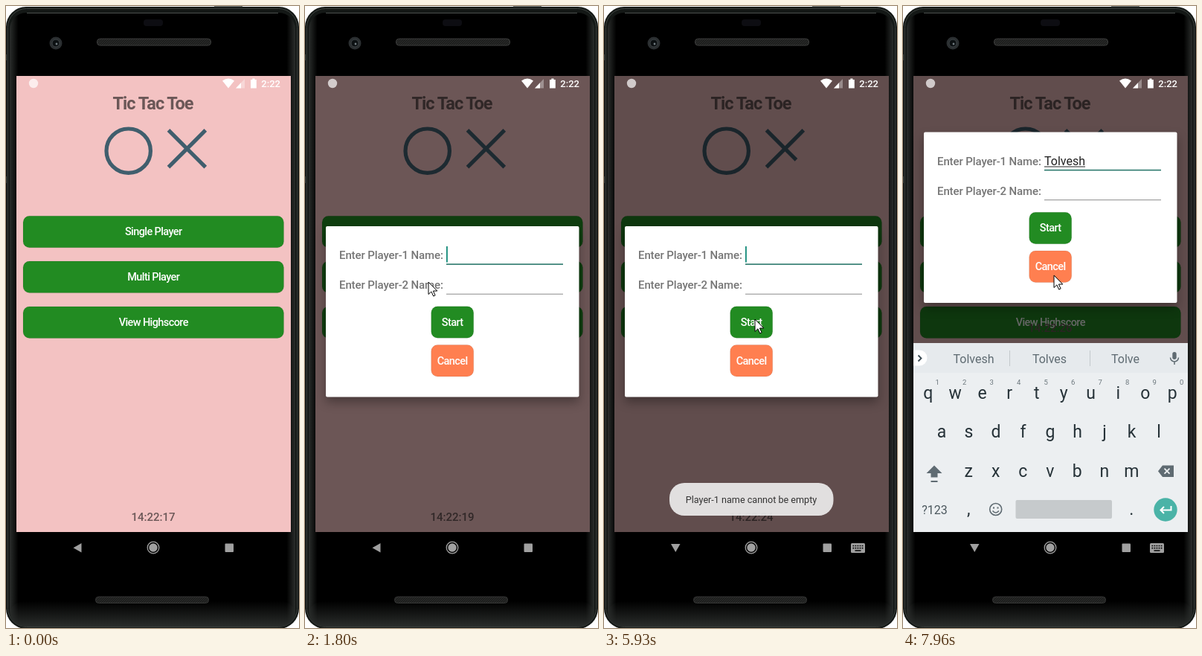
Write an HTML page that moves like this. It is 394 px wide and 836 px high and loops after 7990 ms.

```html
<!DOCTYPE html>
<html lang="en">
<head>
<meta charset="utf-8">
<title>Tic Tac Toe</title>
<style>
html, body { margin: 0; width: 100%; height: 100%; overflow: hidden; background: #fff; }
svg { display: block; width: 100%; height: 100%; }
text { font-family: Roboto, "Noto Sans", sans-serif; }
.mid { text-anchor: middle; }
.title { font-size: 23.5px; font-weight: 700; letter-spacing: -1px; fill: #6b5757; }
.btn { font-size: 14.5px; font-weight: 500; letter-spacing: -.6px; fill: #fff; }
.label { font-size: 15px; font-weight: 500; letter-spacing: -.1px; fill: #757575; }
.clock { font-size: 15px; font-weight: 500; fill: #6b5757; }
.key { font-size: 23px; fill: #263238; }
.num { font-size: 9.5px; fill: #6c777d; }
.sug { font-size: 16px; fill: #5f6b72; }
#dialogBox { filter: drop-shadow(0 7px 7px rgba(0,0,0,.32)); }
</style>
</head>
<body>
<svg viewBox="0 0 394 836">
  <defs>
    <linearGradient id="side">
      <stop offset="0" stop-color="#2a2d2b"/><stop offset=".03" stop-color="#000"/>
      <stop offset=".97" stop-color="#000"/><stop offset="1" stop-color="#2a2d2b"/>
    </linearGradient>
    <linearGradient id="foot" x2="0" y2="1">
      <stop offset="0" stop-color="#2a2d2b" stop-opacity="0"/><stop offset="1" stop-color="#2a2d2b"/>
    </linearGradient>
    <pattern id="mesh" width="3" height="3" patternUnits="userSpaceOnUse">
      <rect width="3" height="3" fill="#282928"/><path d="M0 3L3 0" stroke="#161716"/>
    </pattern>
  </defs>

  <g id="phone">
    <rect y="1" width="394" height="836" rx="27" fill="#141816"/>
    <rect x="2.500" y="3.500" width="389" height="831" rx="25" fill="none" stroke="#3b403d"/>
    <rect x="5" y="9" width="384" height="825" rx="22" fill="url(#side)"/>
    <rect x="5" y="800" width="384" height="34" rx="20" fill="url(#foot)"/>
    <path d="M28 9.5H366" stroke="#4a4f4c"/>
    <path d="M.5 65v8M.5 229v9M280 .8h38" stroke="#3b403d"/>
    <rect x="185" y="18" width="26" height="9" rx="4" fill="#0d0d12"/>
    <circle cx="67" cy="50" r="8.500" fill="#2b2f31"/>
    <circle cx="67" cy="50" r="5" fill="#0c1012" stroke="#3d4346"/>
    <circle cx="68" cy="51" r="1.400" fill="#717b80"/>
    <rect x="122.500" y="44" width="153" height="9" rx="4" fill="url(#mesh)" stroke="#3c3d3c"/>
    <rect x="120.500" y="794" width="152" height="8.500" rx="4" fill="url(#mesh)" stroke="#363736"/>
  </g>

  <rect x="14" y="94" width="369" height="613" fill="#f3c2c2"/>
  <text class="title mid" x="197.500" y="138.700">Tic Tac Toe</text>
  <g fill="none" stroke="#405e6d" stroke-width="5.200">
    <circle id="ring" cx="164.700" cy="194.700" r="29.700" pathLength="1"/>
    <path id="rise" d="M218.500 216.700L268.300 166.900" pathLength="1"/>
    <path id="fall" d="M218.500 166.900L268.300 216.700" pathLength="1"/>
  </g>
  <g id="menu"></g>
  <text id="clock" class="clock mid" x="198" y="691.500"></text>
  <rect id="dim" x="14" y="94" width="369" height="613"/>

  <g id="status" fill="#fff">
    <circle cx="37" cy="104" r="6.200" opacity=".7"/>
    <path d="M291 100.500Q299 94.500 307 100.500L299 110.500Z"/>
    <path d="M321 98V110.500H309Z" opacity=".35"/>
    <path d="M316 103.200V110.500H309Z"/>
    <path d="M329 99h2.300v-1.500h3.200V99h2.300v11.500H329Z"/>
    <text x="343.300" y="109" font-size="13" font-weight="500">2:22</text>
  </g>

  <g id="dialog">
    <rect id="dialogBox" x="28" y="296" width="340.500" height="229.500" rx="2" fill="#fff"/>
    <text class="label" x="46" y="340">Enter Player-1 Name:</text>
    <text class="label" x="46" y="380">Enter Player-2 Name:</text>
    <rect x="190" y="346.300" width="157" height="1.600" fill="#2c786c"/>
    <rect x="190" y="386.700" width="157" height="1" fill="#8a8a8a"/>
    <text id="name" x="190" y="340" font-size="16" fill="#212121"></text>
    <rect id="nameLine" x="190" y="342" height="1" fill="#212121"/>
    <rect id="caret" y="323" width="1.800" height="21.500" fill="#128a78"/>
    <g id="actions"></g>
  </g>

  <g id="board">
    <rect x="14" y="453" width="369" height="254" fill="#eceff1"/>
    <rect x="14" y="453" width="369" height="40" fill="#e6eaed"/>
    <path d="M14 462.500H22a10.500 10.500 0 0 1 0 21H14Z" fill="#fff"/>
    <path d="M20.500 469.500l4 4-4 4" fill="none" stroke="#37474f" stroke-width="1.800"/>
    <path d="M143.500 463v21M251.500 463v21" stroke="#c3c9cc"/>
    <g id="sugs"></g>
    <g fill="#5f6b72">
      <rect x="362.300" y="465" width="5.400" height="10" rx="2.700"/>
      <path d="M359.500 472.500a5.500 5.500 0 0 0 11 0M365 478v4" fill="none" stroke="#5f6b72" stroke-width="1.500"/>
      <path d="M42 617.500l10.500 10.500H46.500v5.500h-9V628H31.500Z"/>
      <rect x="37.500" y="638" width="9" height="2"/>
      <path d="M349 617.500h15v15.500h-15l-6-7.700Z"/>
    </g>
    <path d="M351.500 621.700l7 7m0-7l-7 7" stroke="#eceff1" stroke-width="1.800"/>
    <g id="keys"></g>
    <text class="mid" x="42.500" y="682.500" font-size="16" fill="#4c585e">?123</text>
    <g fill="none" stroke="#5f6b72" stroke-width="1.600">
      <circle cx="124.700" cy="676.500" r="8"/>
      <path d="M120.500 678.500q4.200 5 8.400 0"/>
      <path d="M121 674.500h2m3.500 0h2" stroke-width="2"/>
    </g>
    <rect x="151.500" y="664" width="129.500" height="25" rx="2" fill="#c6cacc"/>
    <circle cx="353" cy="677" r="15.700" fill="#4ab3a7"/>
    <path d="M360.500 672v5.500H346.500m4.500-4.500l-4.500 4.500 4.500 4.500" fill="none" stroke="#fff" stroke-width="2"/>
  </g>

  <g id="toast">
    <rect x="88" y="641" width="220.500" height="44" rx="20" fill="#eeeeee" opacity=".91"/>
    <text class="mid" x="198" y="668" font-size="12.600" fill="#333">Player-1 name cannot be empty</text>
  </g>

  <g fill="#a0a0a0">
    <path id="back"/>
    <circle cx="198" cy="728" r="5.700"/>
    <circle cx="198" cy="728" r="7.800" fill="none" stroke="#a0a0a0" stroke-width="1.300"/>
    <rect x="294.500" y="722.500" width="11.500" height="11.500" rx="1"/>
    <g id="boardIcon">
      <rect x="332" y="722" width="19" height="13" rx="1.500"/>
      <path d="M334.500 725.500h14m-14 3.200h14" stroke="#000" stroke-width="1.700" stroke-dasharray="1.700 1.350"/>
      <path d="M337.500 732h8" stroke="#000" stroke-width="1.500"/>
    </g>
  </g>

  <path id="mouse" d="M0 0V16.500L3.900 12.900 6.700 19 9.100 17.900 6.400 12H11.800Z" fill="#fff" stroke="#000"/>
  <circle id="press" r="15" fill="#ff0" opacity=".52"/>
</svg>
<script>
const LOOP = 7990;
const $ = id => document.getElementById(id);
const set = (id, attrs) => {
  for (const k in attrs) $(id).setAttribute(k, attrs[k]);
};
const show = (id, on) => { $(id).style.visibility = on ? 'visible' : 'hidden'; };
const clamp = v => Math.max(0, Math.min(1, v));

const linear = x => x;
const easeOut = x => 1 - (1 - x) ** 2;
const smooth = x => x * x * (3 - 2 * x);

// Value of a [time, value] table at t
function track(steps, t, ease = linear) {
  if (t <= steps[0][0]) return steps[0][1];
  for (let i = 1; i < steps.length; i++) {
    const [t0, a] = steps[i - 1], [t1, b] = steps[i];
    if (t < t1) return a + (b - a) * ease((t - t0) / (t1 - t0));
  }
  return steps[steps.length - 1][1];
}
// Last entry already reached in a [time, value] list
const latest = (steps, t) => steps.filter(s => s[0] <= t).pop()[1];

const button = (x, y, w, fill, label) =>
  `<rect x="${x}" y="${y}" width="${w}" height="42.500" rx="8.500" fill="${fill}" stroke="#000" stroke-opacity=".12" stroke-width=".7"/>
   <text class="btn mid" x="${x + w / 2}" y="${y + 26}">${label}</text>`;
$('menu').innerHTML = ['Single Player', 'Multi Player', 'View Highscore']
  .map((s, i) => button(23, 282.3 + i * 60.8, 350.5, '#228b22', s)).join('');
$('actions').innerHTML =
  button(169.7, 403.8, 57, '#228b22', 'Start') + button(169.7, 455.5, 57, '#ff7f50', 'Cancel');

const rows = [['qwertyuiop', 33.7, 527.5], ['asdfghjkl', 52, 580], ['zxcvbnm', 88.3, 632.5]];
const keyText = (c, x, y, cls = 'key') => `<text class="${cls} mid" x="${x}" y="${y}">${c}</text>`;
$('keys').innerHTML = rows.map(([letters, x0, y], r) => [...letters].map((c, i) => {
  const x = x0 + i * 36.5;
  return keyText(c, x, y) + (r ? '' : keyText((i + 1) % 10, x + 12.5, 509, 'num'));
}).join('')).join('') + keyText(',', 88.3, 684) + keyText('.', 307.3, 684);
$('sugs').innerHTML = [95, 197, 299].map(x => keyText('', x, 479.5, 'sug')).join('');

const LOGO = [[0, 1], [80, 1], [400, 0], [1670, 1], [1850, 1], [2250, 0], [3560, 1],
  [3790, 1], [4475, 0], [5700, 1], [5890, 1], [6700, 0], [7960, 1]];
const TICKS = [0, 500, 1400, 2350, 3150, 4000, 4900, 5700, 6820, 7750];
const MOUSE_X = [[300, 300], [1100, 166], [1900, 166], [2200, 320], [2420, 343], [3820, 343], [4480, 203]];
const MOUSE_Y = [[300, 711], [1100, 371], [1900, 371], [2200, 272], [2420, 315], [3820, 315], [4480, 421],
  [7710, 421], [7940, 362]];
const PRESSES = [[1400, 1540], [4600, 4760]];
const NAME = 'Tolvesh';
const TYPED = [[0, 0], [6120, 1], [6300, 2], [6810, 3], [6930, 4], [7050, 5], [7170, 6], [7290, 7]];
const HINTS = [[0, ['Tol', 'Tolves', 'To']], [6300, ['To', 'Tolves', 'Tol']],
  [6930, ['Tolv', 'Tolves', 'Tol']], [7170, ['Tolves', 'Tolve', 'Tolv']], [7290, ['Tolvesh', 'Tolves', 'Tolve']]];

function stroke(id, v) {
  show(id, v > 0);
  set(id, { 'stroke-dasharray': `${clamp(v)} 2` });
}

function drawHome(t) {
  const p = track(LOGO, t, easeOut);
  stroke('ring', p / .5);
  stroke('rise', (p - .15) / .35);
  stroke('fall', (p - .5) / .5);
  const ticks = TICKS.filter(s => s <= t).length - 1;
  $('clock').textContent = '14:22:' + (17 + ticks);
  set('clock', { y: t < 6000 ? 691.5 : 438 });
  set('dim', { opacity: track([[1660, 0], [1800, .55], [1850, .6]], t) });
}

function drawDialog(t) {
  const lift = track([[5970, 0], [6160, -115.8], [6340, -126.5]], t, easeOut);
  set('dialog', {
    opacity: track([[1630, 0], [1660, .35], [1740, 1]], t),
    transform: `translate(0 ${lift})`
  });
  const count = latest(TYPED, t);
  $('name').textContent = NAME.slice(0, count);
  const width = count ? $('name').getComputedTextLength() : 0;
  set('nameLine', { width });
  set('caret', { x: 190 + width });
  const blink = (t + 550) % 1000 < 500;
  show('caret', t > 1630 && (t < 5980 ? blink : t < 7385));
}

function drawBoard(t) {
  const drop = track([[5960, 43], [6160, 7], [6320, 0]], t, easeOut);
  set('board', {
    opacity: track([[5960, 0], [6160, .87], [6320, 1]], t),
    transform: `translate(0 ${drop})`
  });
  const hints = latest(HINTS, t);
  [...$('sugs').children].forEach((el, i) => {
    el.textContent = hints[i];
    el.style.fontWeight = i === 1 && t < 7290 ? 700 : 400;
  });
  const open = t >= 5900;
  show('boardIcon', open);
  set('back', { d: open ? 'M90 723H102.500L96.250 734Z' : 'M101.500 722V734.500L90.500 728.200Z' });
  set('toast', { opacity: track([[4920, 0], [5150, 1], [6850, 1], [7200, 0]], t) });
}

function drawMouse(t) {
  const x = track(MOUSE_X, t, smooth), y = track(MOUSE_Y, t, smooth);
  show('mouse', t >= 300);
  set('mouse', { transform: `translate(${x} ${y})` });
  show('press', PRESSES.some(([a, b]) => t >= a && t < b));
  set('press', { cx: x - 1, cy: y - 1 });
}

const start = performance.now();
function frame() {
  const t = (performance.now() - start) % LOOP;
  drawHome(t);
  drawDialog(t);
  drawBoard(t);
  drawMouse(t);
  requestAnimationFrame(frame);
}
frame();
</script>
</body>
</html>
```
